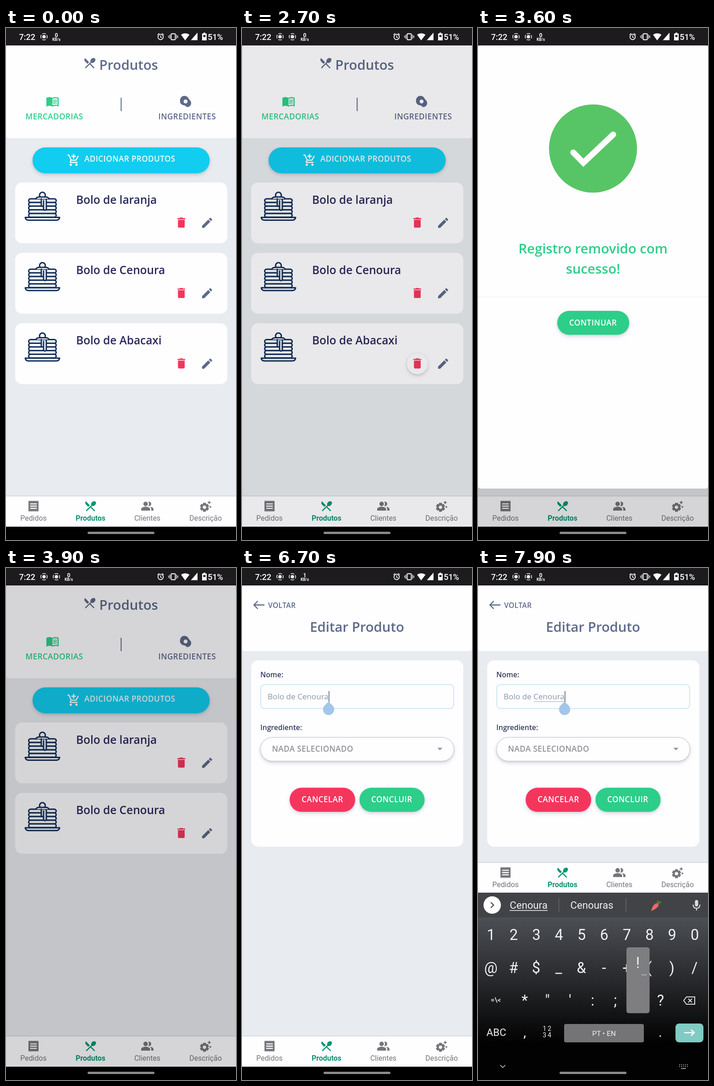
An HTML page for the animation above (8000 ms loop, 502 by 1115 pixels).

```html
<!DOCTYPE html>
<html lang="pt">
<head>
<meta charset="utf-8">
<style>
html, body { margin: 0; width: 100%; height: 100%; overflow: hidden; background: #000; }
svg { display: block; }
text { white-space: pre; }
.os { font-family: "Open Sans", sans-serif; }
.rb { font-family: Roboto, sans-serif; }
.lift { filter: drop-shadow(0 4px 4px rgba(50,50,93,.15)) drop-shadow(0 1px 2px rgba(0,0,0,.1)); }
</style>
</head>
<body>
<svg id="stage" width="502" height="1115" viewBox="0 0 502 1115"></svg>
<script>
const WHITE = '#fefdff', SLATE = '#5e6a8a', GREEN = '#2dce89', RED = '#f5365c',
      NAVY = '#15305a', GREY = '#76767a', ACTIVE = '#0a9573', KEY = '#f1f1f1';

const ICONS = {
  book: 'M21 5c-1.11-.35-2.33-.5-3.5-.5-1.95 0-4.05.4-5.5 1.5-1.45-1.1-3.55-1.5-5.5-1.5S2.45 4.9 1 6v14.65c0 .25.25.5.5.5 1.5-.6 3.5-1.15 5-1.15 1.95 0 4.05.4 5.5 1.5 1.35-.85 3.8-1.5 5.5-1.5 1.65 0 3.35.3 4.75 1.05.4.2.75-.1.75-.45V6c-.6-.45-1.25-.75-2-1zm0 13.5c-1.1-.35-2.3-.5-3.5-.5-1.7 0-4.15.65-5.5 1.5V8c1.35-.85 3.8-1.5 5.5-1.5 1.2 0 2.4.15 3.5.5zM13 9.83v1.66c2-.9 4.500-1.200 7-.73V9.240c-2.500-.5-5-.3-7 .59zM13 12.490v1.660c2-.9 4.500-1.200 7-.730V11.900c-2.500-.5-5-.3-7 .59zM13 15.160v1.660c2-.9 4.500-1.200 7-.730v-1.520c-2.500-.5-5-.3-7 .59z',
  dining: 'M8.1 13.34l2.83-2.83L3.91 3.5c-1.56 1.56-1.56 4.09 0 5.66zm6.78-1.81c1.53.71 3.68.21 5.27-1.38 1.91-1.91 2.28-4.65.81-6.12-1.46-1.46-4.2-1.1-6.12.81-1.59 1.59-2.09 3.74-1.38 5.27L3.7 19.87l1.41 1.41L12 14.41l6.88 6.88 1.41-1.41L13.41 13z',
  egg: 'M19 9c-2-2-3.01-7-9.03-7C4.95 2 1.94 6 2 11.52 2.06 17.04 6.96 19 9.97 19c2.01 0 2.01 3 6.02 3C19 22 22 19 22 15.02c0-3.01-1-4.02-3-6.02zm-7 6.5c-1.93 0-3.5-1.57-3.5-3.5S10.07 8.5 12 8.500s3.500 1.570 3.500 3.500-1.570 3.500-3.500 3.500z',
  cart: 'M11 9h2V6h3V4h-3V1h-2v3H8v2h3zm-4 9c-1.1 0-2 .9-2 2s.9 2 2 2 2-.9 2-2-.9-2-2-2zm10 0c-1.1 0-2 .9-2 2s.9 2 2 2 2-.9 2-2-.9-2-2-2zm-9.83-3.25l.03-.12.9-1.63h7.45c.75 0 1.41-.41 1.75-1.03l3.86-7.01L19.42 4l-3.87 7H8.53L4.27 2H1v2h2l3.6 7.59-1.35 2.45C4.52 15.4 5.5 17 7 17h12v-2H7.42c-.13 0-.25-.11-.25-.25z',
  trash: 'M6 19c0 1.1.9 2 2 2h8c1.1 0 2-.9 2-2V7H6zM19 4h-3.5l-1-1h-5l-1 1H5v2h14z',
  pencil: 'M3 17.25V21h3.75L17.81 9.94l-3.75-3.75zM20.71 7.04c.39-.39.39-1.02 0-1.41l-2.34-2.34c-.39-.39-1.02-.39-1.41 0l-1.83 1.83 3.75 3.75z',
  receipt: 'M18 17H6v-2h12zm0-4H6v-2h12zm0-4H6V7h12zM3 22l1.5-1.5L6 22l1.5-1.5L9 22l1.5-1.5L12 22l1.5-1.5L15 22l1.5-1.5L18 22l1.5-1.5L21 22V2l-1.5 1.5L18 2l-1.5 1.5L15 2l-1.5 1.5L12 2l-1.5 1.5L9 2 7.5 3.5 6 2 4.5 3.5 3 2z',
  people: 'M16.67 13.13C18.04 14.06 19 15.32 19 17v3h4v-3c0-2.18-3.57-3.47-6.33-3.87zM15 12c2.21 0 4-1.79 4-4s-1.79-4-4-4c-.47 0-.91.1-1.33.24C14.5 5.27 15 6.58 15 8s-.5 2.73-1.33 3.76c.42.14.86.24 1.33.24zM9 12c2.21 0 4-1.79 4-4s-1.79-4-4-4-4 1.79-4 4 1.79 4 4 4zm0 1c-2.67 0-8 1.34-8 4v3h16v-3c0-2.66-5.33-4-8-4z',
  gear: 'M17.41 6.59L15 5.5l2.41-1.09L18.5 2l1.09 2.41L22 5.5l-2.41 1.09L18.5 9zM21.28 12.72L20.5 11l-.78 1.72-1.72.78 1.72.78.78 1.72.78-1.72L23 13.5zM16.24 14.37l1.94 1.47-2.5 4.33-2.24-.94-.64.37-.3 2.4h-5l-.3-2.41-.64-.37-2.24.94-2.5-4.33 1.94-1.47v-.74l-1.94-1.47 2.5-4.33 2.24.94.64-.37L7.5 6h5l.3 2.41.64.37 2.24-.94 2.5 4.33-1.94 1.47zM13 14c0-1.660-1.340-3-3-3s-3 1.340-3 3 1.340 3 3 3 3-1.340 3-3z'
};

const icon = (name, x, y, color, scale = 1.22) =>
  `<path d="${ICONS[name]}" fill="${color}" fill-rule="evenodd" transform="translate(${x} ${y}) scale(${scale})"/>`;
const rect = (x, y, w, h, r, fill, extra = '') =>
  `<rect x="${x}" y="${y}" width="${w}" height="${h}" rx="${r}" fill="${fill}" ${extra}/>`;
const line = (d, color, width = 2, extra = '') =>
  `<path d="${d}" fill="none" stroke="${color}" stroke-width="${width}" ${extra}/>`;
const circle = (x, y, r, fill, extra = '') =>
  `<circle cx="${x}" cy="${y}" r="${r}" fill="${fill}" ${extra}/>`;
const group = (id, body, extra = '') => `<g id="${id}" ${extra}>${body}</g>`;
const label = (s, x, y, size, fill, { cls = 'os', weight = 600, anchor = 'start', gap = 0 } = {}) =>
  `<text class="${cls}" x="${x}" y="${y}" font-size="${size}" font-weight="${weight}" fill="${fill}" text-anchor="${anchor}" letter-spacing="${gap}">${s}</text>`;
const caps = (s, x, y, fill, size = 17.1) => label(s, x, y, size, fill, { gap: size * .025 });
const heading = (s, x, y, fill, anchor = 'middle') => label(s, x, y, 29.28, fill, { anchor });
const roboto = (s, x, y, size, fill = KEY, weight = 400, gap = 0) =>
  label(s, x, y, size, fill, { cls: 'rb', weight, anchor: 'middle', gap });
const LIFT = 'class="lift"';

const castIcon = x => circle(x, 19, 3.8, '#eee') +
  circle(x, 19, 7, 'none', 'stroke="#ddd" stroke-width="1.7" stroke-dasharray="8 3" stroke-dashoffset="4"');

function statusBar() {
  return rect(0, 0, 502, 38, 0, '#1d1b1e') + roboto('7:22', 46.3, 26, 18, '#fff', 500) + castIcon(83) +
    group('cast', castIcon(0), 'transform="translate(110 0)"') +
    group('speed', `<text id="rate" class="rb" y="19.500" font-size="12" font-weight="700" fill="#fff" text-anchor="middle">0</text>` +
      roboto('KB/s', 0, 28, 8.3, '#fff', 700)) +
    circle(337.500, 19.500, 5.800, 'none', 'stroke="#fff" stroke-width="1.700"') +
    line('M337.500 16v4l2.800 1.700M330.500 15l4-3.500M344.500 15l-4-3.500', '#fff', 1.5) +
    rect(360.500, 12.500, 9, 13, 1, 'none', 'stroke="#fff" stroke-width="1.800"') +
    line('M357.700 14.500v9M372.300 14.500v9M355 16.500v5M375 16.500v5', '#fff', 1.4) +
    '<path d="M382 14.500q9-6 18.500 0L391 27zM418 10v16.500h-14.500zM431 10h4v2h3v15h-10V12h3z" fill="#fff"/>' +
    rect(430.500, 15.500, 5, 4, 0, '#1d1b1e') + roboto('51%', 457, 26, 18, '#fff', 500);
}

function cake() {
  let s = '';
  for (let i = 0; i < 5; i++) s += rect(49.5, 372 + i * 8, 60, 8, 4, '#f8fcfb');
  return `<g stroke="${NAVY}" stroke-width="3" stroke-linejoin="round" stroke-linecap="round">` +
    circle(79.5, 364, 6.3, WHITE) + s +
    `<path d="M65 372q2-4 8-4h13q6 0 8 4M77 372v16h5v-12M82 380v14q3 6 6 0v-21" fill="${WHITE}"/>` +
    `<path d="M42 412.500h75q-1 6-7 6H49q-6 0-7-6z" fill="${WHITE}"/></g>`;
}

const pressable = (id, name, x, y, color) =>
  group(id, circle(x, y, 23, WHITE, LIFT), 'opacity="0"') + icon(name, x - 14.7, y - 15.3, color);

function card(title, i) {
  return group('card' + i, rect(20, 336.500, 463, 132.500, 15, WHITE) + cake() +
    label(title, 153, 382.500, 24.4, '#2a2a5a') +
    pressable('trash' + i, 'trash', 382.700, 424.500, RED) +
    pressable('edit' + i, 'pencil', 439, 425, SLATE), `transform="translate(0 ${i * 153.3})"`);
}

function listPage() {
  return rect(0.500, 38, 501.500, 202, 5, WHITE) + icon('dining', 167.600, 61.200, SLATE, 1.26) +
    heading('Produtos', 203.500, 91, SLATE, 'start') +
    icon('book', 86.900, 145, GREEN) + caps('MERCADORIAS', 42.500, 199, GREEN) +
    rect(250.300, 152, 2, 29, 0, SLATE) +
    icon('egg', 377.300, 145.300, SLATE) + caps('INGREDIENTES', 332.500, 199, SLATE) +
    rect(58, 260, 386.500, 56.500, 28, '#11cdef', LIFT) + icon('cart', 132.700, 273, '#fff', 1.24) +
    caps('ADICIONAR PRODUTOS', 171, 291, '#f6fafc') +
    ['Bolo de laranja', 'Bolo de Cenoura', 'Bolo de Abacaxi'].map(card).join('');
}

function editPage() {
  return rect(0.500, 38, 501.500, 143, 5, WHITE) +
    line('M49 80.500H27M34.500 72L26 80.500l8.500 8.500', SLATE, 2.3) +
    caps('VOLTAR', 57, 86.500, SLATE, 15.6) + heading('Editar Produto', 251, 139, SLATE) +
    rect(20, 201, 463, 406, 15, WHITE) +
    label('Nome:', 40, 238, 15.6, '#363a60') +
    rect(41, 254, 421, 52, 8, WHITE, 'stroke="#c4e2ee" stroke-width="1.500"') +
    label('Bolo de Cenoura', 56, 286, 17.1, '#8898aa', { weight: 400 }) +
    group('typo', rect(122, 290.500, 67, 1, 0, '#9aa3ad')) +
    group('caret', rect(189, 268, 1.600, 24, 0, '#56657c')) +
    group('handle', '<path d="M189 291l8.800 8.500a12.200 12.200 0 1 1-17.600 0z" fill="#a3c6eb"/>') +
    label('Ingrediente:', 40, 353, 15.6, '#363a60') +
    rect(40.500, 369, 422, 51.500, 25.750, WHITE, 'stroke="#c2c4c8" ' + LIFT) +
    caps('NADA SELECIONADO', 65.500, 400, '#8f9296') +
    '<path d="M426.500 391.500h11l-5.500 5.500z" fill="#8f9296"/>' +
    rect(104, 478.500, 143, 52.500, 26, RED, LIFT) + caps('CANCELAR', 130, 510, '#fff') +
    rect(256.500, 478.500, 142, 52.500, 26, GREEN, LIFT) + caps('CONCLUIR', 282, 510, '#fff');
}

function navBar() {
  const item = (s, x, name, ix, on) => icon(name, ix, 1026.600, on ? ACTIVE : GREY) +
    roboto(s, x, 1072.500, 15.9, on ? ACTIVE : GREY, on ? 700 : 400);
  return rect(0, 1018.500, 502, 1.500, 0, '#d4d6da') + rect(0, 1020, 502, 66, 0, WHITE) +
    item('Pedidos', 60, 'receipt', 45.400) + item('Produtos', 184.500, 'dining', 169.700, true) +
    item('Clientes', 308.500, 'people', 293.800) + item('Descrição', 435.700, 'gear', 421);
}

function modal() {
  return rect(0, 38, 502, 965, 5, WHITE) + circle(251, 262.500, 96, '#57c565') +
    line('M208 271l22 22.500 65-61.500', '#fff', 13, 'stroke-linecap="round"') +
    heading('Registro removido com', 251, 491, GREEN) + heading('sucesso!', 251, 535, GREEN) +
    rect(0, 585, 502, 1, 0, '#eceef2') +
    rect(173, 616, 157, 52, 26, GREEN, LIFT) + caps('CONTINUAR', 199, 648, '#fff');
}

function keyboard() {
  const row = (chars, x, y) => [...chars].map((c, i) =>
    roboto(c === '&' ? '&amp;' : c, x + i * 49.4, y, 32.5)).join('');
  const stroke = (d, w = 2, c = '#ddd') => line(d, c, w);
  const symbols = row('1234567890', 28.5, 810) + row('@#$_&-+()/', 28, 882) +
    row('*"\':;!?', 102, 953) + roboto('=\\&lt;', 39, 946, 15, KEY, 500) + roboto('ABC', 40, 1019, 22.3) +
    roboto('12', 152, 1008, 14, KEY, 400, 3) + roboto('34', 152, 1022, 14, KEY, 400, 3);
  const letters = row('qwertyuiop', 28.5, 810) + row('asdfghjkl', 53, 882) + row('zxcvbnm', 102, 953) +
    stroke('M39 932l-10 10h5v8h10v-8h5z') + roboto('?123', 40, 1019, 22.3) +
    circle(151, 1012, 10, 'none', 'stroke="#ddd" stroke-width="2"') + stroke('M146 1014q5 6 10 0M147 1009h2M153 1009h2');
  return rect(0, 707, 502, 408, 0, 'url(#fade)') + rect(0, 707, 502, 54, 0, '#414347') +
    circle(31, 734, 19, '#fff') + stroke('M28 728l6 6-6 6', 2.2, '#444') +
    group('words', roboto('Cenoura', 110.500, 742, 22.2) + rect(69, 745, 83, 1.500, 0, KEY) +
      roboto('Cenouras', 248.500, 742, 22.2) +
      stroke('M176.500 719v30M323 719v30', 1.3, '#686a6e') +
      '<path d="M378 747q3-14 11-17 6 0 5 6-5 7-16 11z" fill="#ee6864"/>' +
      stroke('M391 732l2-8M393 732l6-6', 2.5, '#568b3c')) +
    rect(473.500, 723, 7, 14, 3.500, '#ddd') + stroke('M469.500 733q0 8 7.500 8t7.500-8M477 741v5') +
    group('symbols', symbols) + group('letters', letters) +
    stroke('M455 934h18v16h-18l-6-8zM459 938l8 8M467 938l-8 8') +
    roboto(',', 102, 1021, 30) + roboto('.', 398, 1021, 30) +
    rect(188, 993, 174, 40, 4, '#747476') + roboto('PT • EN', 275, 1018.500, 15.5) +
    rect(431, 992, 61, 41, 8, '#80cbc4') + stroke('M450 1012h21M465 1005.500l7 6.500-7 6.500', 2.4, '#fff') +
    stroke('M48.500 1082.500l5.500 5.500 5.500-5.500', 2, '#999') +
    line('M439 1081.500h19M439 1085.500h19', '#999', 2, 'stroke-dasharray="2 2.250"') + stroke('M443 1090h11', 2, '#999') +
    group('popup', rect(324, 826, 50.500, 143.500, 5, '#7e7e81') + roboto('!', 349, 871, 32.5) +
      [358, 362, 366].map(x => circle(x, 886, 1.1, KEY)).join(''));
}

const stage = document.getElementById('stage');
stage.innerHTML = `<defs><linearGradient id="fade" x1="0" y1="0" x2="0" y2="1">
  <stop offset=".13" stop-color="#4c4f54"/><stop offset=".45" stop-color="#292b2e"/><stop offset=".8" stop-color="#020202"/></linearGradient></defs>` +
  rect(0, 38, 502, 1048, 0, '#e8ebef') + group('list', listPage()) + group('edit', editPage()) +
  group('nav', navBar()) + rect(0, 1086, 502, 29, 0, '#000') +
  rect(0, 38, 502, 1048, 0, '#000', 'id="shade"') + group('modal', modal()) + statusBar() +
  group('keys', keyboard()) + rect(178, 1097, 146, 5, 2.5, '#8b8b8d');

const $ = id => document.getElementById(id);
const show = (id, on) => $(id).setAttribute('opacity', +on);
const move = (id, x, y, scale = 1) => $(id).setAttribute('transform', `translate(${x} ${y}) scale(${scale})`);
const ramp = (t, from, length) => Math.min(1, Math.max(0, (t - from) / length));
const easeOut = p => 1 - (1 - p) ** 2.2;

function draw(t) {
  const arrive = easeOut(ramp(t, 60, 400));
  show('cast', arrive);
  move('speed', 110 + 27 * arrive, 0);
  $('rate').textContent = t >= 4300 && t < 5200 ? 6 : t >= 6200 && t < 7200 ? 1 : 0;

  const editing = t >= 5200;
  show('list', !editing);
  show('edit', editing);
  show('card2', t < 3300);
  show('trash2', ramp(t, 2605, 90));
  show('edit1', ramp(t, 4830, 150));

  // The backdrop leads the dialog in and follows it out.
  show('shade', .16 * (ramp(t, 2625, 150) - ramp(t, 3950, 150)));
  show('modal', ramp(t, 2775, 150) - ramp(t, 3650, 150));
  move('modal', 0, -61 * (1 - easeOut(ramp(t, 2775, 300)) + easeOut(ramp(t, 3650, 300))));

  show('handle', t >= 5700);
  show('caret', t >= 5700 && (t - 5700) % 1000 < 500);
  show('typo', t >= 7000);

  const rise = easeOut(ramp(t, 6710, 280));
  show('keys', rise > 0);
  move('keys', 0, 408 * (1 - rise));
  move('nav', 0, -Math.max(0, 408 * rise - 29) * 378 / 379);
  show('words', t >= 7200);
  show('letters', t < 7500);
  show('symbols', t >= 7500);
  show('popup', t >= 7900);
}

const start = performance.now();
(function tick() {
  draw((performance.now() - start) % 8000);
  requestAnimationFrame(tick);
})();
</script>
</body>
</html>
```
